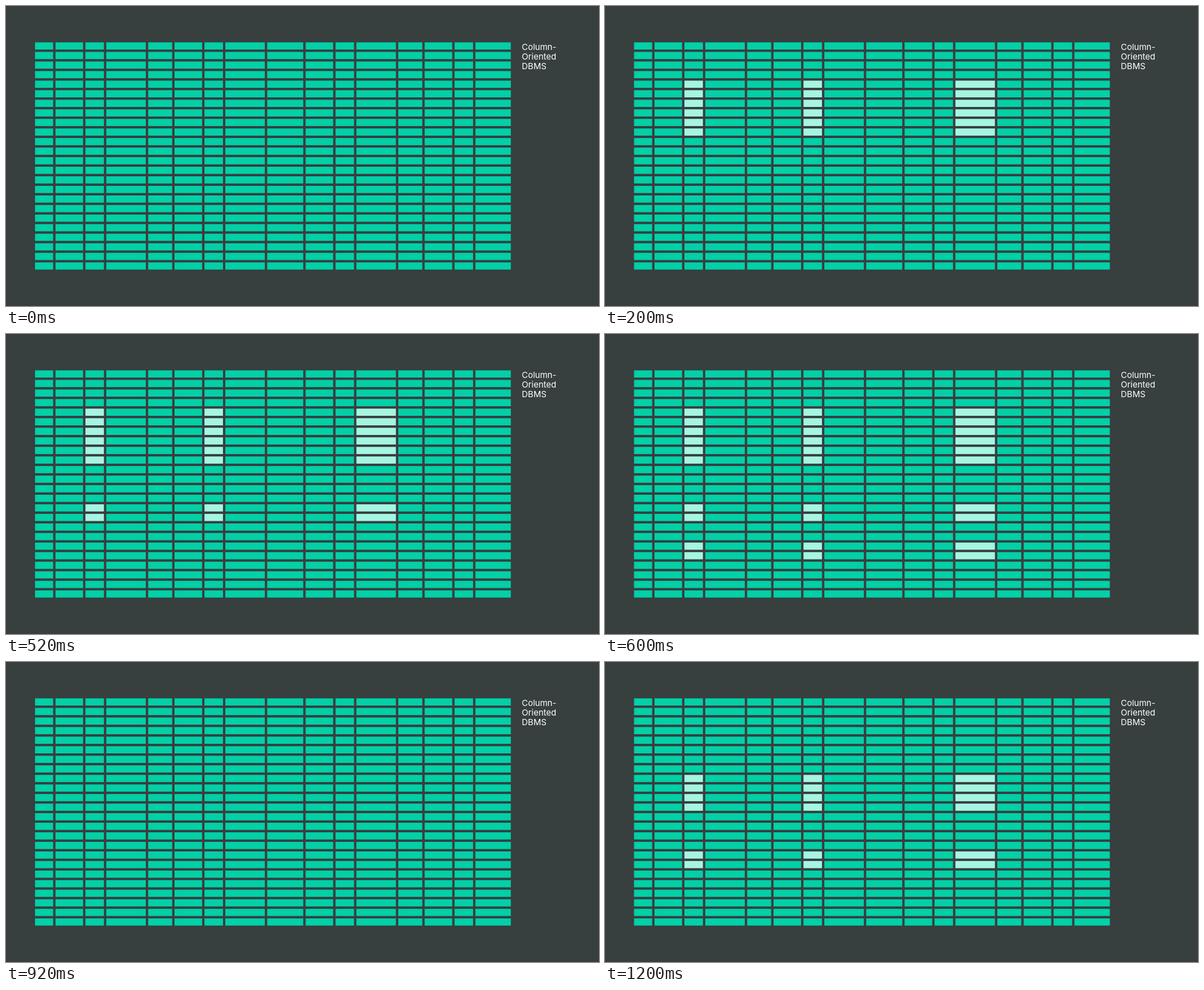
An HTML page with a canvas that plays this animation: 1052x532 px, repeating every 1400 ms.

```html
<!DOCTYPE html>
<html lang="en">
<head>
<meta charset="utf-8">
<title>Column-Oriented DBMS</title>
<style>
  html, body { margin: 0; width: 100%; height: 100%; overflow: hidden; background: #373f3f; }
  canvas, svg { position: absolute; left: 0; top: 0; display: block; }
  text { font: 400 15px Inter, "Liberation Sans", sans-serif; fill: #fff; }
</style>
</head>
<body>
<canvas id="table" width="1052" height="532"></canvas>
<svg width="1052" height="532">
  <text x="915" y="78">Column-</text>
  <text x="915" y="94.8">Oriented</text>
  <text x="915" y="111.6">DBMS</text>
</svg>
<script>
const ctx = document.getElementById("table").getContext("2d");
const BG = "#373f3f", CELL = "#02d0a7", LIT = "#a5f5e2";
const LEFT = 51.5, RIGHT = 895.6, GAP = 4.2;
const TOP = 64.5, ROWS = 24, PITCH = 16.965, HEIGHT = 12.7;
const STEP = 200;

// Columns repeat in groups of four; only the leading one varies in width.
const leads = [32.1, 42.6, 63.9, 42.6];
const columns = [];
let x = LEFT;
for (const lead of leads) {
  for (const width of [lead, 48.9, 32.8, 70.1]) {
    columns.push({ x, width: Math.min(width, RIGHT - x) });
    x += width + GAP;
  }
}
const queried = [2, 6, 11];

// Each scan starts blank, then finds one block of rows per step.
const scans = [
  [{ row: 4, count: 6 }, { row: 14, count: 2 }, { row: 18, count: 2 }],
  [{ row: 8, count: 4 }, { row: 16, count: 2 }]
];
const steps = scans.flatMap(blocks =>
  [[], ...blocks.map((_, i) => blocks.slice(0, i + 1))]);

function drawRow(row, found) {
  const lit = found.some(b => row >= b.row && row < b.row + b.count);
  columns.forEach((column, i) => {
    ctx.fillStyle = lit && queried.includes(i) ? LIT : CELL;
    ctx.fillRect(column.x, TOP + row * PITCH, column.width, HEIGHT);
  });
}

function draw(found) {
  ctx.fillStyle = BG;
  ctx.fillRect(0, 0, 1052, 532);
  for (let row = 0; row < ROWS; row++) drawRow(row, found);
}

const origin = performance.now();

function tick() {
  const elapsed = performance.now() - origin;
  draw(steps[Math.floor(elapsed / STEP) % steps.length]);
  requestAnimationFrame(tick);
}
tick();
</script>
</body>
</html>
```
